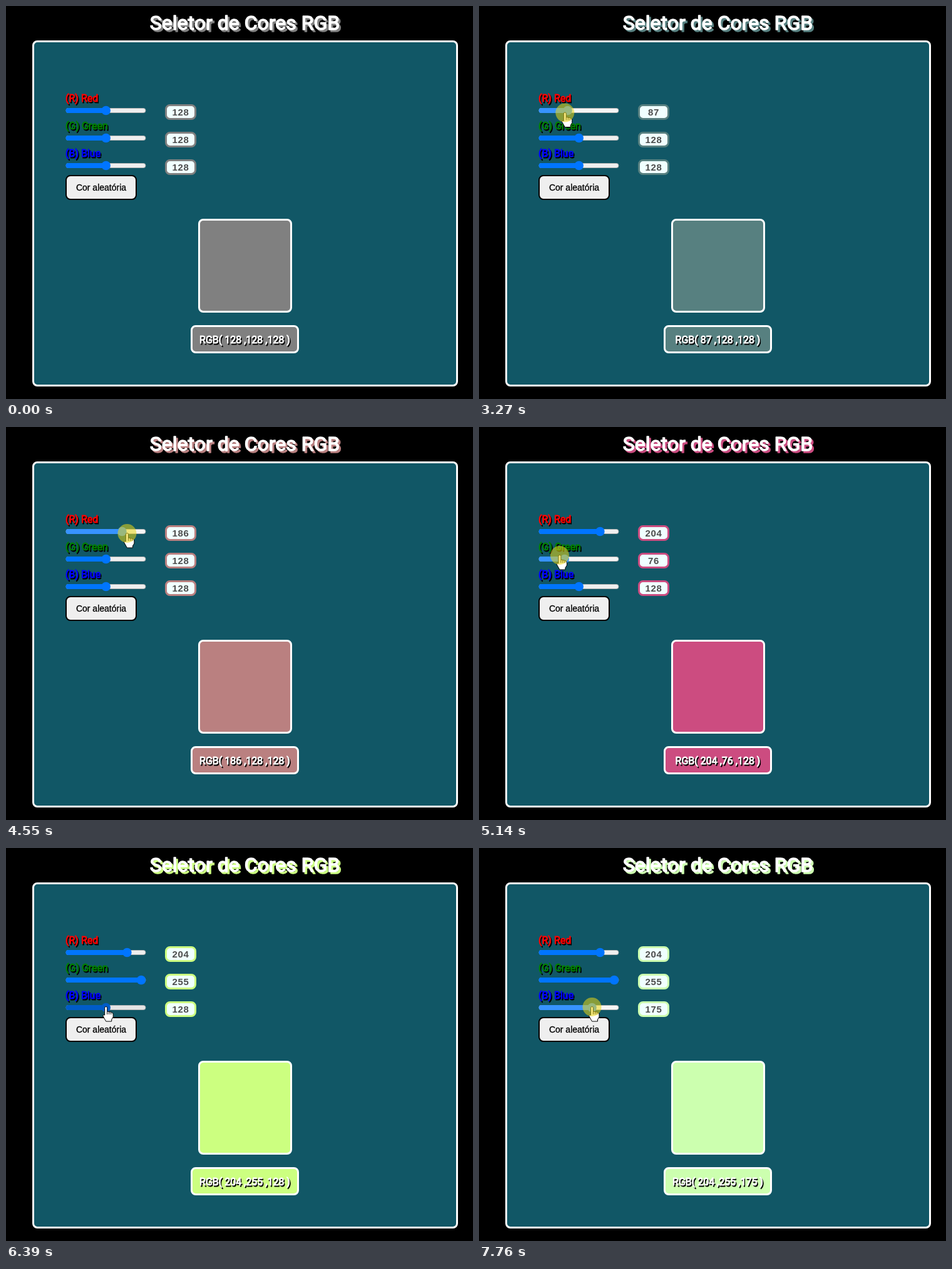
An HTML page with a canvas that plays this animation: 746x628 px, repeating every 8 s.

```html
<!DOCTYPE html>
<html lang="pt">
<head>
<meta charset="utf-8">
<title>Seletor de Cores RGB</title>
<style>
html, body { margin: 0; height: 100%; overflow: hidden; background: #000; }
canvas { display: block; }
</style>
</head>
<body>
<canvas id="stage" width="746" height="628"></canvas>
<script>
const LOOP = 8000;
const LAG = 68; // ms by which a thumb trails the pointer
const ctx = document.getElementById('stage').getContext('2d');
const ROBOTO = 'Roboto, sans-serif';
const ARIAL = '"Liberation Sans", Arial, sans-serif';
const ROWS = [
  { name: '(R) Red', tint: '#f00', press: 2930, release: 4800 },
  { name: '(G) Green', tint: '#008000', press: 4973, release: 6030 },
  { name: '(B) Blue', tint: '#00f', press: 6590, release: LOOP },
];
const ARROW = new Path2D('M0 0V17L4 13.5L6.5 19L9 18L6.5 12.5H12Z');
const HAND = new Path2D('M-2 1.5Q-2-.5 0-.5T2 1.5V7L9 8.5Q11.5 9.5 11.5 12V16L9 20V23H0L-4.5 15Q-6 12-2 13Z');
const KNUCKLES = new Path2D('M2 7V12M5 8V12M8 9V12');

// Pointer path: time, x, y
const PATH = [
  [120, 701, 596], [390, 697, 387], [920, 697, 387],
  [1510, 738, 80], [1840, 240, 186], [2040, 190, 180], [2330, 141, 171],
  [2930, 159.7, 171], [3670, 111, 170], [3870, 111, 170], [4010, 129, 170],
  [4550, 193.4, 170], [4800, 193.4, 170],
  [4973, 159.7, 205], [5072, 136.7, 205], [5140, 129, 205], [5280, 114, 205],
  [5490, 114, 205], [5632, 165.5, 205], [5700, 179, 205], [5840, 222, 210],
  [6030, 222, 210], [6390, 159.7, 254],
  [6790, 159.7, 254], [7002, 103.4, 254], [7270, 102, 254], [7692, 180.5, 254],
];

const clamp = (v, lo, hi) => Math.min(hi, Math.max(lo, v));
const rowY = i => 167 + i * 44;
const toX = v => 103 + v / 255 * 113;
const toValue = x => Math.round(clamp((x - 103) / 113, 0, 1) * 255);

function pointerAt(t) {
  const i = clamp(PATH.findIndex(p => p[0] > t), 1, PATH.length);
  const a = PATH[i - 1], b = PATH[i] || a;
  const p = a === b ? 0 : clamp((t - a[0]) / (b[0] - a[0]), 0, 1);
  return { x: a[1] + (b[1] - a[1]) * p, y: a[2] + (b[2] - a[2]) * p };
}

function stateAt(t) {
  const { x, y } = t >= PATH.at(-1)[0] ? { x: PATH.at(-1)[1], y: PATH.at(-1)[2] } : pointerAt(t);
  return {
    x, y,
    visible: t >= 120 && t < 920 || t >= 1510,
    pressed: ROWS.findIndex(r => t >= r.press && t < r.release),
    hover: ROWS.findIndex((r, i) => x < 224 && Math.abs(y - rowY(i)) < 8),
    rgb: ROWS.map(r => {
      const seen = clamp(t - LAG, r.press, r.release);
      return toValue(seen >= PATH.at(-1)[0] ? PATH.at(-1)[1] : pointerAt(seen).x);
    }),
  };
}

function box(x, y, w, h, r, fill, stroke, line) {
  ctx.beginPath();
  ctx.roundRect(x + line / 2, y + line / 2, w - line, h - line, r - line / 2);
  ctx.fillStyle = fill;
  ctx.fill();
  ctx.strokeStyle = stroke;
  ctx.lineWidth = line;
  ctx.stroke();
}

function dot(x, y, r, fill) {
  ctx.fillStyle = fill;
  ctx.beginPath();
  ctx.arc(x, y, r, 0, 7);
  ctx.fill();
}

function text(str, x, y, font, color, { align = 'center', spacing = 0, bold = 0 } = {}) {
  ctx.font = font;
  ctx.textAlign = align;
  ctx.letterSpacing = spacing + 'px';
  ctx.fillStyle = ctx.strokeStyle = color;
  ctx.fillText(str, x, y);
  if (bold) {
    ctx.lineWidth = bold;
    ctx.strokeText(str, x, y);
  }
}

function heading(str, x, y, size, color, shadow, offset, align) {
  const style = { align, bold: size > 20 ? 1.5 : 0.9 };
  text(str, x + offset, y + offset, `${size}px ${ROBOTO}`, shadow, style);
  text(str, x, y, `${size}px ${ROBOTO}`, color, style);
}

function slider(y, value, hover, active) {
  const x = toX(value);
  const blue = active ? '#3793ff' : hover ? '#005cc8' : '#0075ff';
  const grey = active ? '#f5f5f5' : hover ? '#e5e5e5' : '#efefef';
  box(95.5, y - 4, 128, 8, 4, grey, '#b2b2b2', 1);
  ctx.fillStyle = blue;
  ctx.beginPath();
  ctx.roundRect(95.5, y - 4, x - 95.5, 8, 4);
  ctx.fill();
  dot(x, y, 7.25, blue);
}

function pointer(x, y, cursor, pressed) {
  ctx.save();
  ctx.translate(x, y);
  ctx.fillStyle = '#fff';
  ctx.strokeStyle = '#000';
  ctx.lineWidth = 1;
  ctx.fill(cursor);
  ctx.stroke(cursor);
  if (cursor === HAND) ctx.stroke(KNUCKLES);
  if (pressed) dot(0, 0, 15, 'rgba(235, 215, 20, .55)');
  ctx.restore();
}

function draw(t) {
  const s = stateAt(t);
  const color = `rgb(${s.rgb})`;
  ctx.lineJoin = 'round';
  ctx.fillStyle = '#000';
  ctx.fillRect(0, 0, 746, 628);
  heading('Seletor de Cores RGB', 381.5, 37.5, 32, '#fff', color, 3);
  box(42, 55, 680, 553, 8, '#115766', '#fff', 3);

  ROWS.forEach(({ name, tint }, i) => {
    const y = rowY(i);
    heading(name, 95, y - 14, 16, tint, '#000', 1.5, 'left');
    slider(y, s.rgb[i], s.hover === i, s.pressed === i);
    box(254, y - 10, 50, 25, 8, '#f0ffff', color, 3);
    text(s.rgb[i], 279, y + 8, `bold 15px ${ARIAL}`, '#4d4d4d', { spacing: 0.6 });
  });

  box(95, 270, 114, 40, 8, '#efefef', '#000', 2);
  text('Cor aleatória', 152, 295, `14px ${ARIAL}`, '#000', { bold: 0.3 });
  box(307, 340, 150, 150, 8, color, '#fff', 3);
  box(295, 510, 173, 45, 8, color, '#fff', 3);
  heading(`RGB( ${s.rgb.join(' ,')} )`, 381.5, 539, 16, '#fff', '#000', 1.5);

  const held = s.pressed >= 0;
  if (s.visible) pointer(s.x, s.y, held || s.hover >= 0 ? HAND : ARROW, held);
}

function frame(now) {
  draw(now % LOOP);
  requestAnimationFrame(frame);
}
requestAnimationFrame(frame);
</script>
</body>
</html>
```
